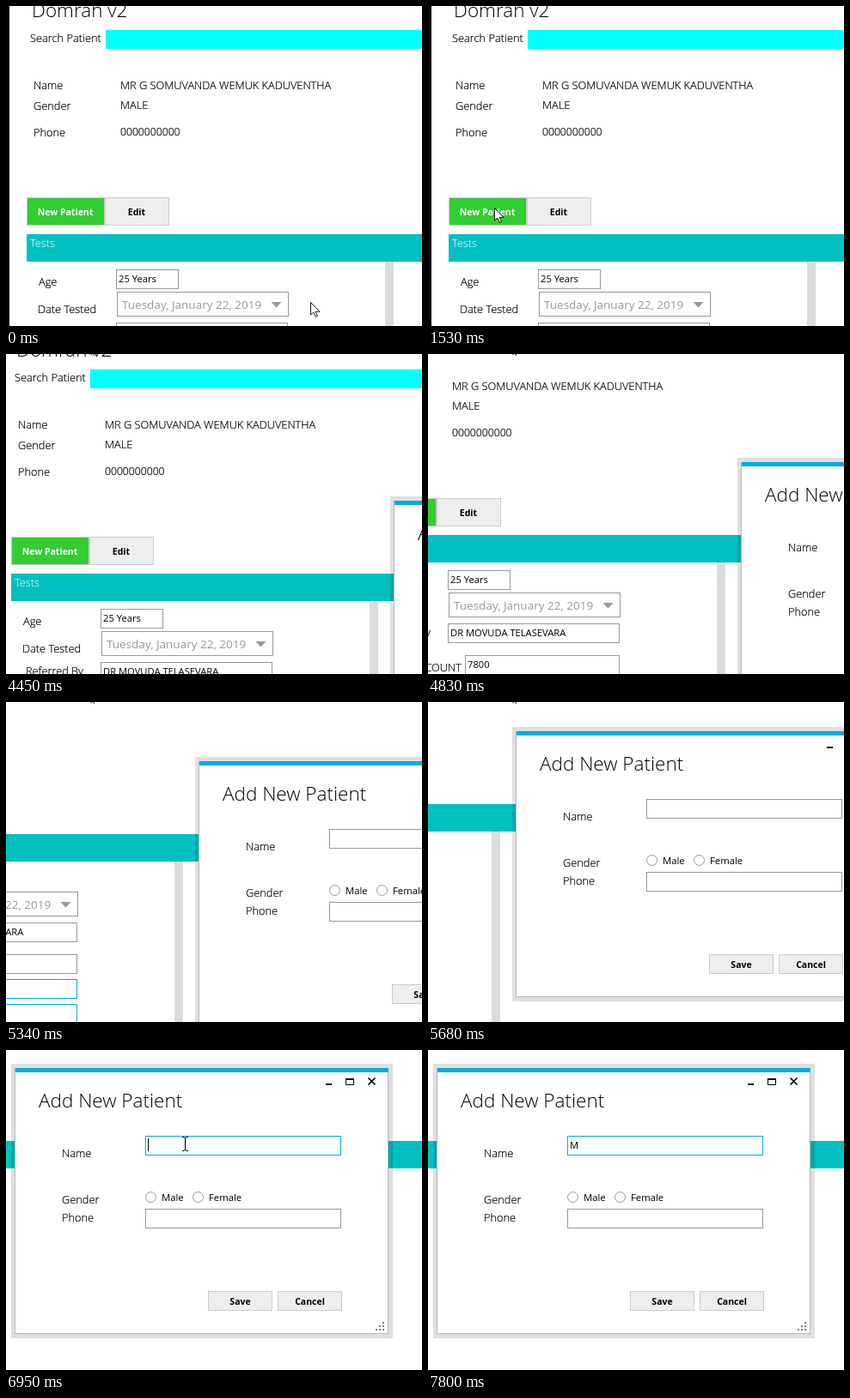
Recreate the animation shown at these times as an HTML page. Size 484x373 px, loop 8 s.

```html
<!DOCTYPE html>
<html lang="en">
<head>
<meta charset="utf-8">
<title>Add patient</title>
<style>
  html, body { margin: 0; width: 100%; height: 100%; overflow: hidden; background: #fff; }
  svg { display: block; width: 484px; height: 373px; }
  text { font: 300 12.8px "Open Sans", "Noto Sans", sans-serif; fill: #000; stroke: #000; stroke-width: .2; white-space: pre; }
  .title, .input, .option, .date, .button { stroke: none; }
  .title { font-size: 22.5px; }
  .phone { font-size: 12.2px; }
  .input { font-size: 11.2px; font-weight: 400; }
  .option { font-size: 11.3px; font-weight: 400; }
  .date { font-size: 13.5px; font-weight: 400; fill: #999; }
  .button { font-size: 10.5px; font-weight: 700; text-anchor: middle; }
  .end { text-anchor: end; }
  .white { fill: #fff; stroke: none; }
</style>
</head>
<body>
<svg id="stage" viewBox="0 0 484 373" xmlns="http://www.w3.org/2000/svg"></svg>
<script>
const LOOP = 8000;
const BLUE = '#00aedb', GRAY = '#999', EDGE = '#ccc', FACE = '#eee';

const text = (x, y, str, cls = '') => `<text x="${x}" y="${y}" class="${cls}">${str}</text>`;
const fill = (x, y, w, h, color, extra = '') =>
  `<rect x="${x}" y="${y}" width="${w}" height="${h}" fill="${color}" ${extra}/>`;
const box = (x, y, w, h, edge = GRAY, face = '#fff', id = '') =>
  `<rect x="${x + .5}" y="${y + .5}" width="${w - 1}" height="${h - 1}" fill="${face}" stroke="${edge}" ${id && `id="${id}"`}/>`;
const radio = (x, y) => `<circle cx="${x}" cy="${y}" r="6" fill="#fff" stroke="${GRAY}"/>`;

const page = [
  fill(0, 0, 4, 700, '#000'),
  text(30, 13, 'Domrah v2', 'title'),
  text(28, 42, 'Search Patient'),
  fill(116, 28, 900, 22, '#0ff'),
  text(32, 97, 'Name'), text(133, 97, 'MR G SOMUVANDA WEMUK KADUVENTHA'),
  text(32, 121, 'Gender'), text(133, 120, 'MALE'),
  text(32, 152, 'Phone'), text(133, 151, '0000000000', 'phone'),
  box(24, 223, 91, 33, EDGE, '#32cd32', 'add'),
  text(69, 244, 'New Patient', 'button white'),
  box(115, 223, 75, 33, EDGE, FACE),
  text(152, 244, 'Edit', 'button'),
  fill(24, 266, 990, 32, '#00c0c0'),
  text(28, 281, 'Tests', 'white'),
  fill(441, 298, 10, 400, '#dcdcdc'),
  text(38, 326, 'Age'), box(128, 307, 73, 23), text(131, 322, '25 Years', 'input'),
  text(37, 358, 'Date Tested'), box(129, 333, 200, 29),
  text(135, 353, 'Tuesday, January 22, 2019', 'date'),
  `<path d="M308.500 345h12l-6 6.500z" fill="${GRAY}"/>`,
  text(108, 384, 'Referred By', 'end'), box(128, 369, 200, 23),
  text(131, 384, 'DR MOVUDA TELASEVARA', 'input'),
  text(144, 425, 'WBC COUNT', 'end'), box(148, 406, 180, 23), text(151, 421, '7800', 'input'),
  box(148, 435, 180, 23, BLUE),
  box(148, 464, 180, 30, BLUE)
].join('');

let grip = '';
for (let row = 0; row < 3; row++)
  for (let col = 0; col <= row; col++) grip += fill(427 - col * 4, 296 + row * 4, 2, 2, '#808080');

const dialog = [
  `<path d="M-5-5h444v320h-444zM0 0v310h434v-310z" fill="#000" fill-opacity=".125"/>`,
  box(-1, 0, 435, 310, '#b8b8b8'),
  fill(0, 0, 434, 5, BLUE),
  fill(361, 18, 7, 2, '#000'),
  `<path d="M384.500 12v7.500h9V12M384 12.500h10M384 13.500h10" fill="none" stroke="#000"/>`,
  `<path d="M410.500 11.500l8 8m0-8l-8 8" stroke="#000" stroke-width="1.700"/>`,
  text(27, 46, 'Add New Patient', 'title'),
  text(54, 104, 'Name'), box(151, 79, 228, 23, GRAY, '#fff', 'name'),
  text(54, 158, 'Gender'),
  radio(157.5, 150.5), text(170, 155, 'Male', 'option'),
  radio(212.5, 150.5), text(225, 155, 'Female', 'option'),
  text(54, 179, 'Phone'), box(151, 164, 228, 23),
  box(224, 260, 75, 23, EDGE, FACE), text(261.5, 276, 'Save', 'button'),
  box(305, 260, 75, 23, EDGE, FACE), text(342.5, 276, 'Cancel', 'button'),
  grip,
  `<text id="typed" x="154" y="94" class="input"></text>`,
  fill(0, 82, 1, 15, '#000', 'id="caret"')
].join('');

document.getElementById('stage').innerHTML = `
  <rect width="484" height="373" fill="#fff"/>
  <g id="world">${page}<g id="dialog" transform="translate(470 181)">${dialog}</g></g>
  <path id="tail" d="M98.500 0l1.500 1.500M101.500 0l1.500 2" fill="none" stroke="#000"/>
  <path id="beam" d="M205 101.500h2l1.500 1 1.500-1h2M208.500 102v15M205 117.500h2l1.500-1 1.500 1h2" fill="none" stroke="#000"/>
  <path id="arrow" d="M.5.5v14.500l3.300-3 2.500 5.300 2.200-1-2.400-5h4.900z" fill="#fff" stroke="#000" stroke-width=".9"/>`;

const el = {};
for (const id of ['world', 'dialog', 'add', 'name', 'typed', 'caret', 'tail', 'beam', 'arrow'])
  el[id] = document.getElementById(id);

// Pointer positions: time, x, y
const POINTER = [
  [0, 354, 345], [330, 340, 339], [400, 300, 322], [480, 250, 305], [560, 208, 291],
  [640, 176, 281], [720, 149, 272], [790, 117, 256], [870, 92, 240], [1040, 83, 237], [1110, 77, 235]
];
// Pan path: time, x, y
const PAN = [
  [4290, 0, 0], [4530, 36, 19], [4830, 105, 55], [5340, 245, 112],
  [5460, 288, 126], [5750, 392, 154], [6020, 452, 159], [6170, 459, 160]
];
// The screen refreshes only at these moments during the pan
const TICKS = [0, 4350, 4410, 4470, 4530, 4680, 4750, 4830, 4980, 5080, 5180, 5260,
  5340, 5460, 5610, 5680, 5750, 5900, 5960, 6020, 6100, 6170];

const last = (list, ok) => list.filter(ok).pop();
const show = (node, on) => node.setAttribute('visibility', on ? 'visible' : 'hidden');
const move = (node, x, y) => node.setAttribute('transform', `translate(${x} ${y})`);

function panAt(t) {
  if (t <= PAN[0][0]) return [0, 0];
  const i = PAN.findIndex(k => k[0] >= t);
  if (i < 0) return PAN[PAN.length - 1].slice(1);
  const a = PAN[i - 1], b = PAN[i], p = (t - a[0]) / (b[0] - a[0]);
  return [1, 2].map(n => Math.round(a[n] + (b[n] - a[n]) * p));
}

function addEdge(t) {
  if (t < 870 || t >= 1530) return EDGE;
  return t >= 1340 && t < 1440 ? '#333' : '#666';
}

function draw(t) {
  const [px, py] = panAt(last(TICKS, k => k <= t));
  move(el.world, -px, -py);

  const [, x, y] = last(POINTER, k => k[0] <= t);
  move(el.arrow, x, y);
  show(el.arrow, t < 3830);
  el.add.setAttribute('stroke', addEdge(t));

  show(el.dialog, t >= 3830);
  show(el.tail, t >= 4130 && t < 6950);
  show(el.beam, t >= 6950 && t < 7240);
  el.name.setAttribute('stroke', t >= 6950 ? BLUE : GRAY);
  el.typed.textContent = t >= 7240 ? 'M' : '';
  el.caret.setAttribute('x', t >= 7240 ? 165 : 154);
  show(el.caret, t >= 6950 && t < 7800);
}

const start = performance.now();
function loop() {
  draw((performance.now() - start) % LOOP);
  requestAnimationFrame(loop);
}
loop();
</script>
</body>
</html>
```
